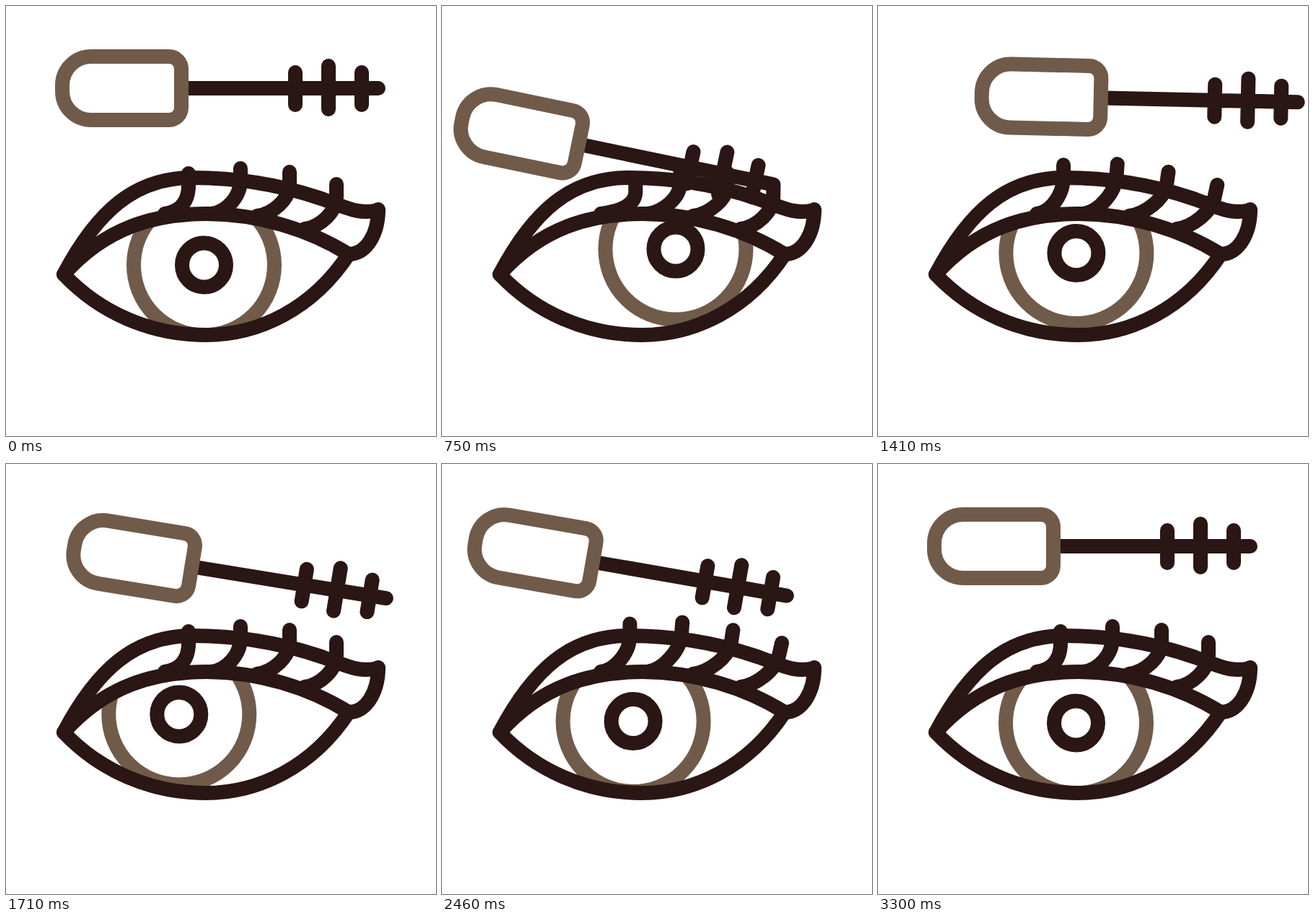
Recreate the animation shown at these times as an HTML page. Size 596 px wide and 596 px high, loop 3600 ms.

```html
<!DOCTYPE html>
<html lang="en">
<head>
<meta charset="utf-8">
<title>Mascara</title>
<style>
  html, body { margin: 0; width: 100%; height: 100%; overflow: hidden; background: #fff; }
  svg { display: block; width: 100vw; height: 100vh; }
  .line { fill: none; stroke: #2a1614; stroke-width: 20; stroke-linecap: round; stroke-linejoin: round; }
  .soft { stroke: #705b4a; }
</style>
</head>
<body>
<svg viewBox="0 0 596 596">
  <defs>
    <path id="almond" d="M80 372C138 307 205 288 278 288C350 288 420 310 475 344C425 420 350 456 277 456C200 456 130 425 80 372Z"/>
    <clipPath id="opening"><use href="#almond"/></clipPath>
  </defs>
  <g clip-path="url(#opening)">
    <circle class="line soft eyeball" r="97.5"/>
  </g>
  <circle class="line eyeball" r="30.5"/>
  <path id="lashes" class="line"/>
  <g class="line">
    <use href="#almond"/>
    <path d="M80 372C126 285 178 238 258 238C330 238 388 250 440 268C475 281 490 289 516 283"/>
    <path d="M516 282C516 315 500 344 475 344"/>
  </g>
  <g id="wand" class="line">
    <path d="M248 114H516M401 92V137M447 83V143M493 92V137"/>
    <path class="soft" d="M118 70H226a17 17 0 0 1 17 17V141a17 17 0 0 1-17 17H118a40 40 0 0 1-40-40V110a40 40 0 0 1 40-40Z"/>
  </g>
</svg>
<script>
const LOOP = 3600, STEP = 30, END = 3300;

// Wand: brush centre and tilt at each turning point
const wandKeys = [
  { t: 0, x: 447, y: 113.5, turn: 0 },
  { t: 600, x: 377.4, y: 242, turn: 12.7 },
  { t: 1390, x: 513, y: 131, turn: 1.2 },
  { t: 2145, x: 371, y: 245, turn: 22.3 },
  { t: 2820, x: 458, y: 78, turn: -5.4 },
  { t: END, x: 447, y: 113.5, turn: 0 }
];
const eyeKeys = [
  { t: 0, x: 274.5, y: 359 },
  { t: 860, x: 326, y: 336.2 },
  { t: 1900, x: 232.3, y: 347.9 },
  { t: 2715, x: 274.5, y: 359 }
];
const lashes = [
  { root: [220, 288], tip: [253, 232] },
  { root: [285, 288], tip: [325, 225] },
  { root: [348, 291], tip: [393, 230] },
  { root: [414, 309], tip: [458, 247] }
];

const ease = p => (1 - Math.cos(Math.PI * Math.max(0, Math.min(1, p)))) / 2;

// Rises from start to peak, then falls until end
const bump = (t, start, peak, end) =>
  ease(t < peak ? (t - start) / (peak - start) : (end - t) / (end - peak));

function sample(keys, t) {
  const i = Math.max(0, keys.findLastIndex(k => k.t <= t));
  const a = keys[i], b = keys[i + 1] || a;
  const p = a === b ? 0 : ease((t - a.t) / (b.t - a.t));
  const mix = name => a[name] + (b[name] - a[name]) * p;
  return { x: mix("x"), y: mix("y"), turn: mix("turn") };
}

// Lifting leans outer lashes more and stretches inner ones more; pushing fades outwards
function lashPath({ root: [rx, ry], tip }, i, lift, push) {
  const x = tip[0] + lift * (9 + 6 * i) + push * 15 / 3 ** i;
  const y = tip[1] + lift * Math.min(2, 13 * i - 26) + push * 9 / 3 ** i;
  const lean = 0.16 * i * lift;
  const along = d => [x - lean * d, y + d];
  return `M${x} ${y}L${along(17)}C${along(38)} ${rx + 22} ${ry - 3} ${rx} ${ry}`;
}

const wand = document.getElementById("wand");
const lashLine = document.getElementById("lashes");
const eyeballs = document.querySelectorAll(".eyeball");

function draw(t) {
  const w = sample(wandKeys, t);
  wand.setAttribute("transform",
    `translate(${w.x} ${w.y}) rotate(${w.turn}) translate(${-wandKeys[0].x} ${-wandKeys[0].y})`);

  const eye = sample(eyeKeys, t);
  for (const ball of eyeballs) ball.setAttribute("transform", `translate(${eye.x} ${eye.y})`);

  const lift = bump(t, 700, 1150, 1640) + 0.94 * bump(t, 2145, 2770, 3250);
  const push = bump(t, 450, 750, 1110) + 0.6 * bump(t, 2100, 2250, 2600);
  lashLine.setAttribute("d", lashes.map((lash, i) => lashPath(lash, i, lift, push)).join(""));
}

function tick() {
  const t = performance.now() % LOOP;
  draw(Math.min(END, Math.floor(t / STEP) * STEP));
  requestAnimationFrame(tick);
}
tick();
</script>
</body>
</html>
```
